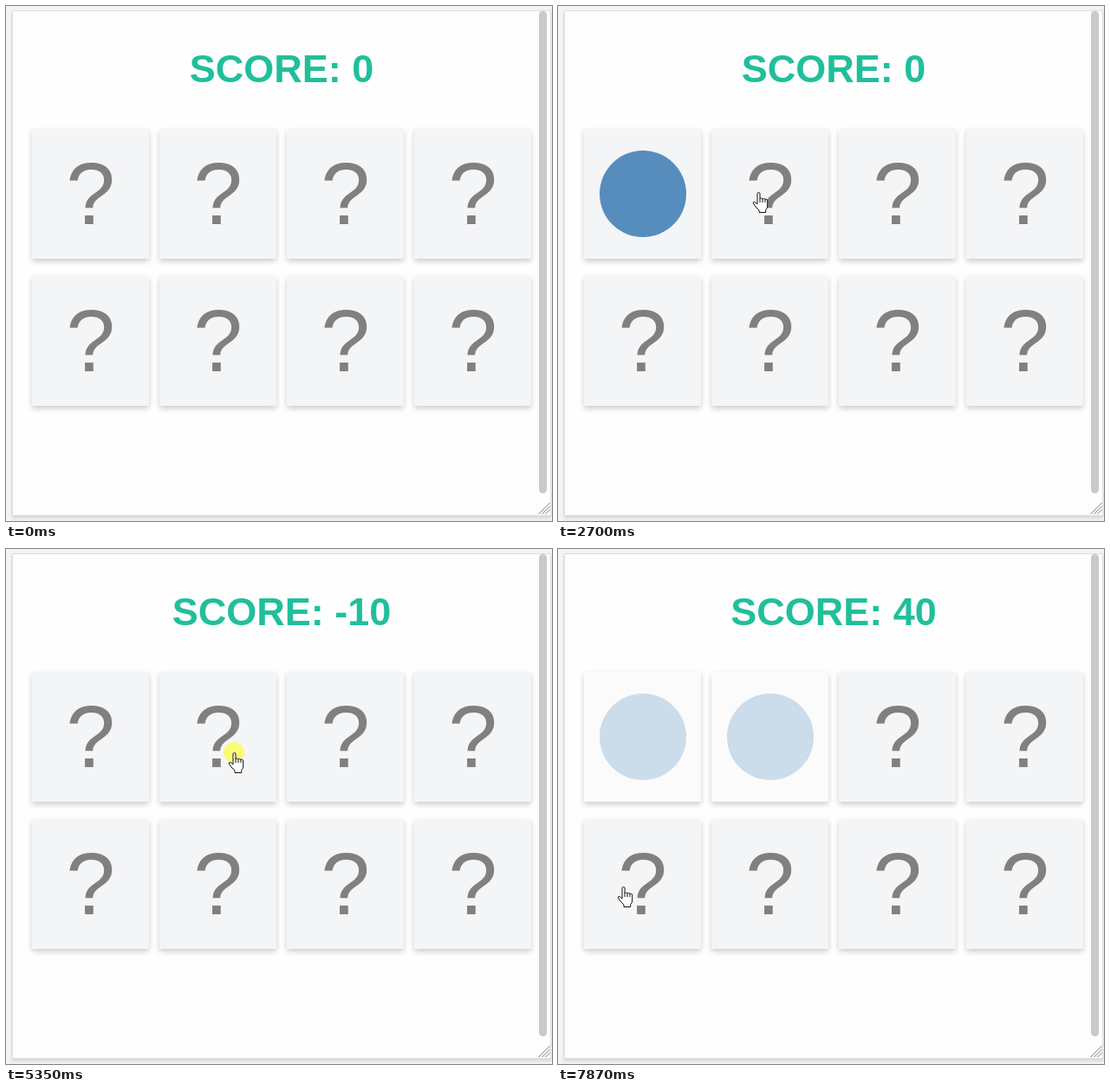
These frames come from a looping animation (630x595 px, 8000 ms). An HTML page:

```html
<!DOCTYPE html>
<html lang="en">
<head>
<meta charset="utf-8">
<title>Memory game</title>
<style>
html, body { margin: 0; width: 630px; height: 595px; overflow: hidden; background: #f4f4f4; }
body { position: relative; font-family: "Liberation Sans", Arial, sans-serif; }
body * { position: absolute; box-sizing: border-box; }
#panel { left: 7px; top: 5px; width: 622px; height: 584px; background: #fefefe;
  border: 1px solid #ddd; box-shadow: 0 3px 4px rgba(0,0,0,.12); }
#thumb { left: 615px; top: 6px; width: 9px; height: 557px; border-radius: 5px; background: #c9c9c9; }
#score { left: 8px; width: 620px; top: 47px; line-height: 52px; text-align: center;
  font-size: 45px; font-weight: bold; color: #20bf9b; white-space: pre; }
.card { width: 135px; height: 150px; transform-style: preserve-3d; }
.face { inset: 0; border-radius: 2px; background: #fff; backface-visibility: hidden;
  box-shadow: 0 3px 6px rgba(0,0,0,.2); }
.back { transform: rotateY(180deg); }
.fill { inset: 0; border-radius: 2px; background: #f4f5f7; color: #808080;
  font-size: 102px; line-height: 150px; text-align: center; }
.dot { left: 50%; top: 50%; border-radius: 50%; transform: translate(-50%, -50%); }
#click { width: 24px; height: 24px; border-radius: 50%; background: rgba(255,255,0,.5); }
svg { left: 0; top: 0; overflow: visible; }
</style>
</head>
<body>
<div id="panel"></div>
<div id="thumb"></div>
<svg width="630" height="595"><path d="M614.5 587l13-13M618.5 587l9-9M622.5 587l5-5" stroke="#777" fill="none"/></svg>
<div id="score"></div>
<div id="board"></div>
<div id="click"></div>
<svg id="cursor" width="20" height="26" fill="#fff" stroke="#111" stroke-linejoin="round">
  <path id="arrow" d="M.5.5V16.5L4.2 13l2.6 6 2.4-1-2.6-5.6h5.2z"/>
  <path id="hand" transform="translate(-6.5)" d="M5.5 14V2q0-1.5 1.5-1.5T8.5 2v6q0-1 1.5-1t1.5 1.5q0-1 1.5-1t1.5 1.5q0-.8 1.3-.8T17.2 10v6q0 3-2 4.5v3H7.5v-2.5Q3 17 .8 13q-.4-1.7 1.5-1.5 1.4.3 3.2 2.5zM8.5 8v4M11.5 8.5V12M14.5 9v3"/>
</svg>
<script>
const LOOP = 8000, FLIP = 600;
const BLUE = '#568dbd', CYAN = '#61dafb';
const icons = [BLUE, BLUE, CYAN];
const flips = [[1916, 4250, 6710], [5500], [3268, 4250]]; // toggle times per card
const clicks = [[1810, 1910], [3130, 3250], [5350, 5500], [6660, 6740]];
const path = [ // time, x, y
  [950, 436, 360], [1610, 114, 214], [2500, 114, 214], [2910, 356, 217], [4500, 356, 217],
  [4950, 263, 235], [6260, 263, 235], [6460, 74, 233], [6750, 74, 233], [7060, 58, 318],
  [7360, 52, 330], [7560, 52, 330], [7870, 75, 390]
];

const $ = id => document.getElementById(id);
const clamp = v => Math.min(1, Math.max(0, v));
const smooth = v => v * v * (3 - 2 * v);
const show = (el, on) => { el.style.visibility = on ? 'visible' : 'hidden'; };

// cubic-bezier(.25, .1, .25, 1), solved by bisection
function ease(x) {
  const bez = (s, a, b) => 3 * s * (1 - s) ** 2 * a + 3 * s * s * (1 - s) * b + s ** 3;
  if (x <= 0 || x >= 1) return clamp(x);
  let lo = 0, hi = 1;
  for (let i = 0; i < 20; i++) {
    const mid = (lo + hi) / 2;
    if (bez(mid, .25, .25) < x) lo = mid; else hi = mid;
  }
  return bez(lo, .1, 1);
}

const cards = Array.from({ length: 8 }, (_, i) => {
  const card = document.createElement('div');
  card.className = 'card';
  card.style.left = 30 + i % 4 * 147 + 'px';
  card.style.top = 142 + (i >> 2) * 170 + 'px';
  const size = icons[i] === CYAN ? 94 : 100;
  card.innerHTML = `<div class="face"><div class="fill">?</div></div>
    <div class="face back"><div class="fill"><div class="dot"
    style="width:${size}px;height:${size}px;background:${icons[i] || BLUE}"></div></div></div>`;
  $('board').append(card);
  return card;
});

function pointer(t) {
  const n = path.findIndex(p => p[0] > t);
  if (n < 0) return path[path.length - 1].slice(1);
  if (n === 0) return path[0].slice(1);
  const [t0, x0, y0] = path[n - 1], [t1, x1, y1] = path[n];
  const k = smooth((t - t0) / (t1 - t0));
  return [x0 + (x1 - x0) * k, y0 + (y1 - y0) * k];
}

function overHidden(x, y, t) {
  const col = Math.floor((x - 30) / 147), row = Math.floor((y - 142) / 170);
  if (x - 30 - col * 147 > 135 || y - 142 - row * 170 > 150) return false;
  return (flips[row * 4 + col] || []).filter(s => t >= s).length % 2 === 0;
}

function draw(t) {
  $('score').textContent = 'SCORE: ' + (t < 4250 ? 0 : t < 6760 ? -10 : 40);
  flips.forEach((times, i) => {
    const turn = times.reduce((sum, s, n) => sum + (n % 2 ? -1 : 1) * ease((t - s) / FLIP), 0);
    cards[i].style.transform = `perspective(1000px) rotateY(${180 * turn}deg)`;
  });
  const fade = 1 - .7 * ease((t - 6990) / 450);
  for (const i of [0, 1]) cards[i].querySelector('.back .fill').style.opacity = fade;

  const [x, y] = pointer(t).map(Math.round);
  const visible = t >= 990, hand = overHidden(x, y, t);
  $('cursor').style.transform = `translate(${x}px, ${y}px)`;
  show($('hand'), visible && hand);
  show($('arrow'), visible && !hand);
  $('click').style.transform = `translate(${x - 12}px, ${y - 12}px)`;
  show($('click'), clicks.some(([a, b]) => t >= a && t < b));
}

const start = performance.now();
function tick() {
  draw((performance.now() - start) % LOOP);
  requestAnimationFrame(tick);
}
tick();
</script>
</body>
</html>
```
